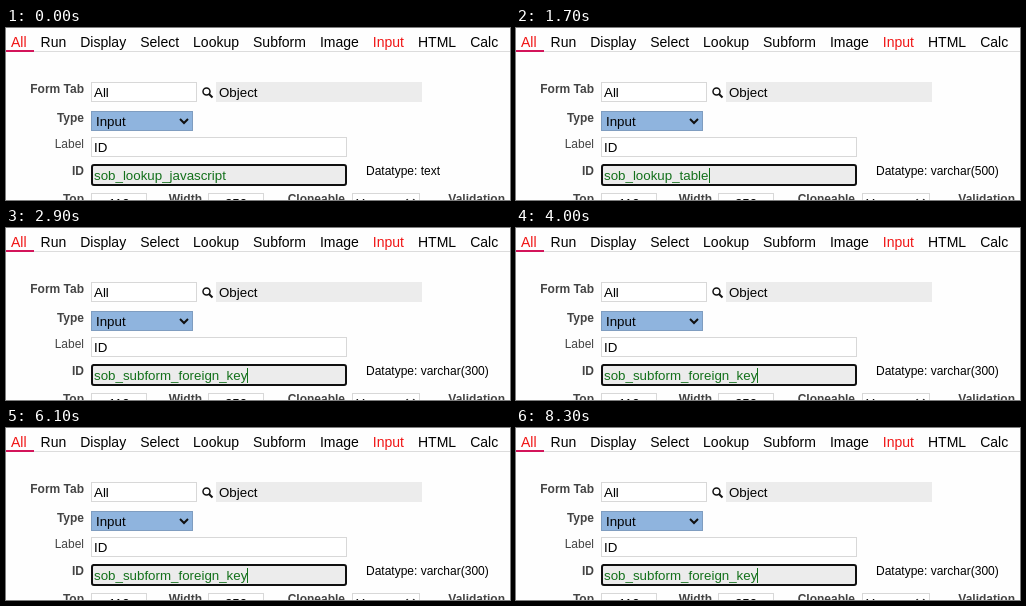
These frames come from a looping animation (504x172 px, 8.5 s). An HTML page:

```html
<!DOCTYPE html>
<html lang="en">
<head>
<meta charset="utf-8">
<title>Form field lookup</title>
<style>
  html, body { margin: 0; width: 100%; height: 100%; overflow: hidden; background: #fefefe; }
  svg { display: block; font: 13.333px "Liberation Sans", Arial, sans-serif; }
  .nav { font-size: 14px; }
  .red { fill: #f01414; }
  .label, .note { font-size: 12px; }
  .label { fill: #444; text-anchor: end; }
  .bold { font-weight: bold; }
  .mid { text-anchor: middle; }
  .box { fill: #fff; stroke: #d8d8d8; }
  .arrow { fill: none; stroke: #111; stroke-width: 2; }
</style>
</head>
<body>
<svg width="504" height="172" viewBox="0 0 504 172">
  <text id="nav" class="nav" y="19"></text>
  <path d="M0 23.5H504" stroke="#dcdcdc"/>
  <path d="M0 23H28" stroke="#d3145a" stroke-width="2"/>

  <g id="labels"></g>

  <rect class="box" x="85.5" y="54.5" width="105" height="19"/>
  <text x="88" y="69">All</text>
  <g fill="none" stroke="#111">
    <circle cx="200.5" cy="63.5" r="3.5" stroke-width="1.5"/>
    <path d="M203 66L206.5 69.5" stroke-width="2"/>
  </g>
  <rect x="210" y="54" width="206" height="20" fill="#ececec"/>
  <text x="213" y="69">Object</text>

  <rect x="85.5" y="83.5" width="101" height="19" fill="#8fb4de" stroke="#7f9dc0"/>
  <text x="90" y="98">Input</text>
  <path class="arrow" d="M174 91L178 95L182 91"/>

  <rect class="box" x="85.5" y="109.5" width="255" height="19"/>
  <text x="88" y="124">ID</text>

  <rect x="86" y="137" width="254" height="20" rx="2" fill="#ececec" stroke="#101010" stroke-width="2"/>
  <text id="value" x="88" y="152"></text>
  <rect id="caret" y="140" width="1" height="15"/>
  <text id="type" class="note" x="360" y="147"></text>

  <rect class="box" x="85.5" y="165.5" width="55" height="19"/>
  <text class="mid" x="113" y="180">110</text>
  <rect class="box" x="202.5" y="165.5" width="55" height="19"/>
  <text class="mid" x="230" y="180">250</text>
  <rect class="box" x="346.5" y="165.5" width="67" height="19"/>
  <text x="350" y="180">Yes</text>
  <path class="arrow" d="M400.5 171.5L404.5 175.5L408.5 171.5"/>
</svg>
<script>
const LOOP = 8500;
const $ = id => document.getElementById(id);

$("nav").innerHTML = "All Run Display Select Lookup Subform Image Input HTML Calc".split(" ")
  .map((name, i) => `<tspan ${i ? 'dx="14"' : 'x="5"'}${/All|Input/.test(name) ? ' class="red"' : ""}>${name}</tspan>`)
  .join("");

$("labels").innerHTML = [
  ["Form Tab", 78, 65], ["Type", 78, 94], ["Label", 78, 120], ["ID", 78, 147],
  ["Top", 78, 175], ["Width", 196, 175], ["Cloneable", 339, 175], ["Validation", 499, 175]
].map(([name, x, y]) =>
  `<text class="label${name === "Label" ? "" : " bold"}" x="${x}" y="${y}">${name}</text>`).join("");

// Field contents: start time, value, column type (empty when no column matches)
const values = [
  [0, "sob_lookup_javascript", "text"],
  [1000, "sob_lookup_php", "varchar(25)"],
  [1700, "sob_lookup_table", "varchar(500)"],
  [2200, "sob_subform_zzzzsys_form_id", "varchar(300)"],
  [2800, "sob_subform_foreign_key", "varchar(300)"],
  [4700, "sob_subform_foreign_ke", ""],
  [6100, "sob_subform_foreign_key", "varchar(300)"]
];
// The caret toggles at each time, starting hidden
const blinks = [500, 1500, 1700, 3400, 4000, 4500, 4700, 5500, 6100, 6600, 7100, 7700, 8200];

let shown;
function draw(now) {
  const t = now % LOOP;
  const current = values.findLast(v => v[0] <= t);
  if (current !== shown) {
    const [, value, type] = shown = current;
    const color = type ? "#12701a" : "#111";
    $("value").textContent = value;
    $("value").setAttribute("fill", color);
    $("caret").setAttribute("fill", color);
    $("caret").setAttribute("x", Math.round(88 + $("value").getComputedTextLength()));
    $("type").textContent = type && "Datatype: " + type;
  }
  const on = blinks.filter(b => b <= t).length % 2;
  $("caret").setAttribute("visibility", on ? "visible" : "hidden");
}

const start = performance.now();
function tick() {
  draw(performance.now() - start);
  requestAnimationFrame(tick);
}
tick();
</script>
</body>
</html>
```
